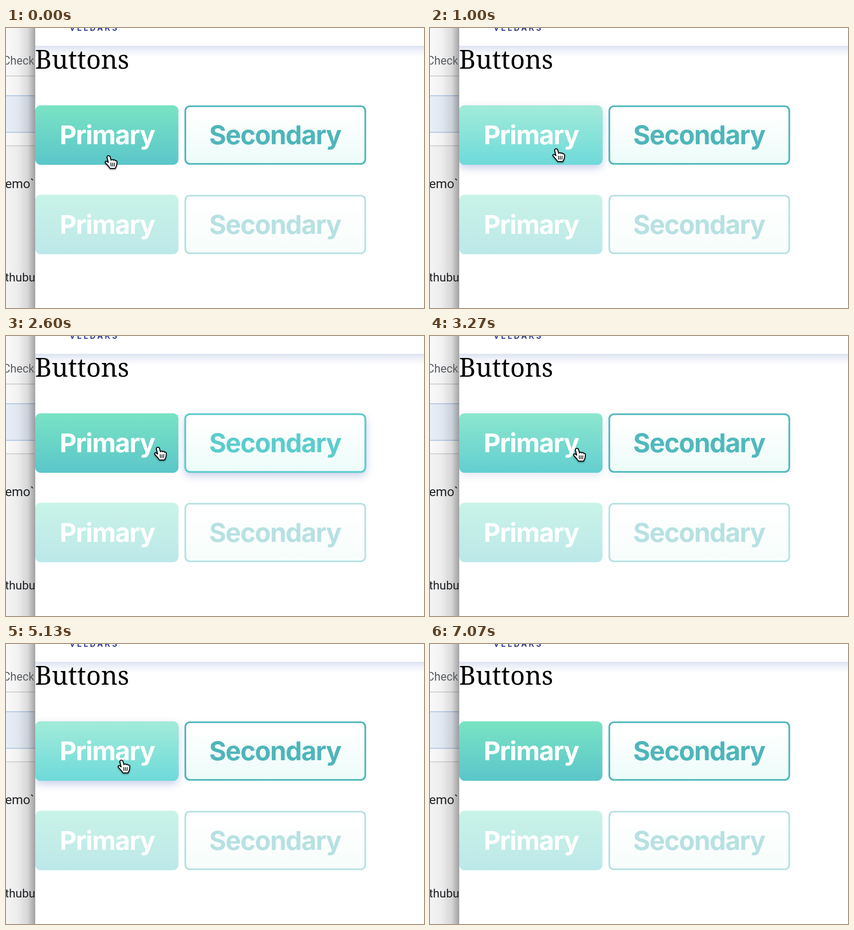
Animation of 915x612 px, one loop 7140 ms. Source, as an HTML page:

```html
<!DOCTYPE html>
<html lang="en">
<head>
<meta charset="utf-8">
<title>Button states</title>
<style>
  html, body { margin: 0; width: 100%; height: 100%; overflow: hidden; background: #fff; }
  svg { display: block; }
  .side { font-family: Roboto, "Liberation Sans", sans-serif; font-size: 26px; fill: #1f2124; }
  .logo { font: 600 17px Inter, sans-serif; letter-spacing: 4.2px; fill: #1c2b86; }
  .title { font: 56px "Noto Serif", serif; letter-spacing: .1px; }
  .label { font: 700 57px Inter, sans-serif; letter-spacing: -1.6px; text-anchor: middle; }
  .lift { filter: drop-shadow(0 7px 9px rgba(90, 115, 190, .34)); }
  #hand { filter: drop-shadow(0 2px 1.5px rgba(0, 0, 0, .4)); }
</style>
</head>
<body>
<svg width="915" height="612" viewBox="0 0 915 612">
  <defs>
    <linearGradient id="shade">
      <stop offset="0" stop-opacity=".01"/>
      <stop offset=".4" stop-opacity=".04"/>
      <stop offset=".75" stop-opacity=".13"/>
      <stop offset="1" stop-opacity=".34"/>
    </linearGradient>
    <linearGradient id="header" x2="0" y2="1">
      <stop offset="0" stop-color="#dce2f2"/>
      <stop offset=".45" stop-color="#eff2f9"/>
      <stop offset="1" stop-color="#fff"/>
    </linearGradient>
    <linearGradient id="normal" x2="0" y2="1">
      <stop offset="0" stop-color="#79e3c4"/>
      <stop offset="1" stop-color="#5bc6ca"/>
    </linearGradient>
    <linearGradient id="hover" x2="0" y2="1">
      <stop offset="0" stop-color="#a2ebd9"/>
      <stop offset="1" stop-color="#6edada"/>
    </linearGradient>
    <linearGradient id="pale" x2="0" y2="1">
      <stop offset=".15" stop-color="#fff"/>
      <stop offset="1" stop-color="#ecfcf9"/>
    </linearGradient>
  </defs>

  <!-- window behind -->
  <rect width="63" height="612" fill="#f6f6f7"/>
  <rect width="63" height="258" fill="#fcfcfc"/>
  <rect y="148" width="63" height="80" fill="#eaf1fb"/>
  <path d="M0 105H63M0 257.5H63" stroke="#d2d3d5" stroke-width="2"/>
  <path d="M0 148H63M0 228H63" stroke="#b4cbea" stroke-width="2"/>
  <rect width="63" height="612" fill="url(#shade)"/>
  <g class="side">
    <text x="62" y="80" text-anchor="end" style="font-size:25px;fill:#5a5f66">Check</text>
    <text x="62" y="350" text-anchor="end" style="font-size:28px">emo`</text>
    <text x="-2" y="554">thubu</text>
  </g>

  <!-- page -->
  <svg x="63" width="852" height="612" viewBox="63 0 852 612">
    <rect x="63" width="852" height="612" fill="#fff"/>
    <rect x="63" y="39" width="852" height="24" fill="url(#header)"/>
    <text class="logo" x="139" y="6">VELDAKS</text>
    <text class="title" x="63.500" y="89">Buttons</text>
    <g id="buttons"></g>
    <path d="M63 0V612" stroke="#858585" stroke-width="1.5"/>
  </svg>

  <g id="hand" stroke="#000" stroke-linecap="round" stroke-linejoin="round">
    <path fill="#fff" stroke-width="2" d="M-9-11C-8-15-3-15-2-11L0-4C1-6 4-6 5-4C6-5.5 8.5-5 9-3C11-4 13-2 13 0L12 8L9 14H-2L-5 10L-12 2C-14-1-11-3-8.500-1L-6 1Z"/>
    <path fill="none" stroke-width="1.6" d="M-.5 2L0 9M3.500 2V9M7.500 2L7 9"/>
  </g>
</svg>
<script>
const LOOP = 7140;
const FPS = 15;

// Places the pointer passes through; it moves evenly between them.
const stops = [
  { t: 0, x: 230, y: 293 },
  { t: 1470, x: 306, y: 271 },
  { t: 2050, x: 436, y: 256 },
  { t: 2600, x: 338, y: 257 },
  { t: 4200, x: 312, y: 263 },
  { t: 5130, x: 258, y: 267 },
  { t: 6930, x: 318, y: 640 }
];

const ramp = (t, from, ms) => Math.min(1, Math.max(0, (t - from) / ms));

// Hover glow: fades in slowly after entering, out after leaving.
const glow = (t, enter, leave) => ramp(t, enter, 1200) ** 2 * (1 - ramp(t, leave, 800));

function pointer(t) {
  const i = Math.max(1, stops.findIndex(s => s.t > t));
  const [a, b] = t < stops.at(-1).t ? [stops[i - 1], stops[i]] : stops.slice(-2);
  const f = ramp(t, a.t, b.t - a.t);
  return [a.x + (b.x - a.x) * f, a.y + (b.y - a.y) * f];
}

const solid = (y, fill, extra = '') => `
  <rect x="64" y="${y}" width="313.5" height="130" rx="12" fill="url(#${fill})" ${extra}/>
  <text class="label" x="221.500" y="${y + 85}" fill="#fff">Primary</text>`;
const outline = (y, color, extra = '') => `
  <rect x="392.500" y="${y + 2}" width="394" height="126" rx="10" fill="url(#pale)"
    stroke="${color}" stroke-width="3.7" ${extra}/>
  <text class="label" x="589" y="${y + 85}" fill="${color}">Secondary</text>`;

const $ = id => document.getElementById(id);
const lift = 'class="lift"';
$('buttons').innerHTML = `
  ${solid(169, 'normal')}
  ${outline(169, '#4db6ba')}
  <g id="hotPrimary">${solid(169, 'hover', lift)}</g>
  <g id="hotSecondary">${outline(169, '#5bcdcd', lift)}</g>
  <g opacity=".4">${solid(364.5, 'normal')}${outline(364.5, '#4db6ba')}</g>`;

const hand = $('hand'), hotPrimary = $('hotPrimary'), hotSecondary = $('hotSecondary');

function draw(now) {
  const t = Math.floor((now % LOOP) * FPS / 1000 + .05) * 1000 / FPS;
  hand.setAttribute('transform', `translate(${pointer(t)})`);
  hotPrimary.setAttribute('opacity', glow(t, -200, 1650) + glow(t, 2450, 5400));
  hotSecondary.setAttribute('opacity', glow(t, 1400, 2600));
}

let start;
function tick(now) {
  start ??= now;
  draw(now - start);
  requestAnimationFrame(tick);
}
draw(0);
requestAnimationFrame(tick);
</script>
</body>
</html>
```
